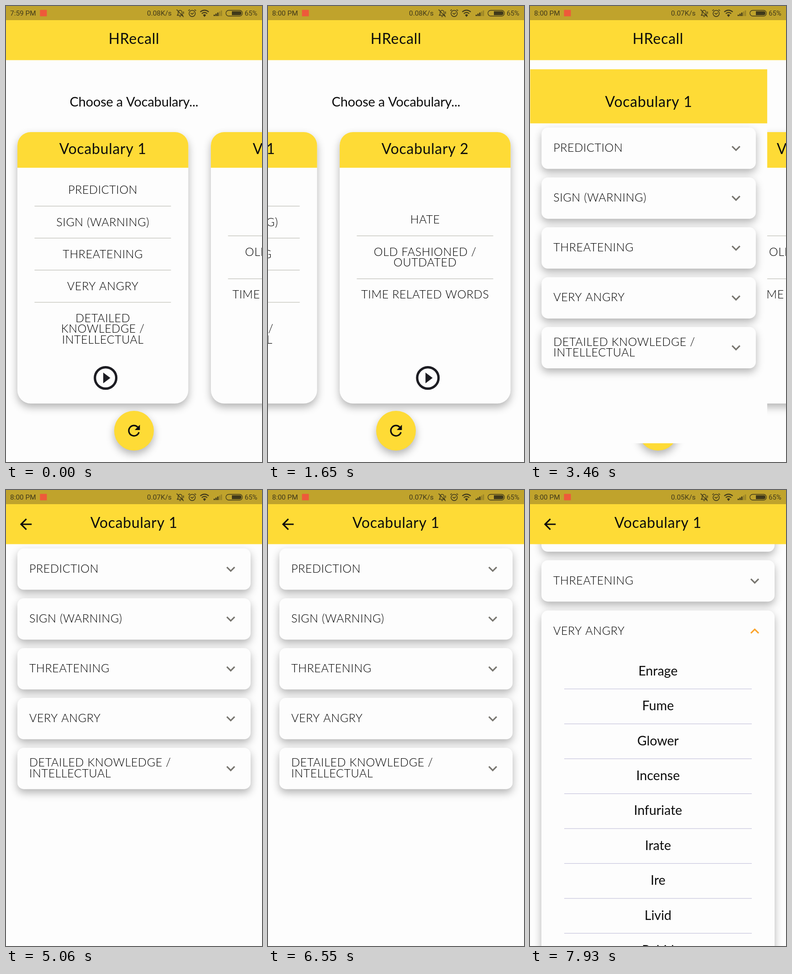
Animation, 561 px wide and 998 px high, one loop 7.99 s. Source, as an HTML page with a canvas:

```html
<!DOCTYPE html>
<html lang="en">
<head>
<meta charset="utf-8">
<title>Vocabulary cards</title>
<style>
  html, body { margin: 0; width: 100%; height: 100%; overflow: hidden; background: #fdfdfd; }
  canvas { display: block; width: 100vw; height: 100vh; }
</style>
</head>
<body>
<canvas id="stage"></canvas>
<script>
const W = 561, H = 998, LOOP = 7990, BAR = 118.5;
const YELLOW = '#fedb36', PAPER = '#fdfdfd', INK = '#0c0c0c', ORANGE = '#fba32b';
const canvas = document.getElementById('stage'), ctx = canvas.getContext('2d');
const dpr = window.devicePixelRatio || 1;
canvas.width = W * dpr;
canvas.height = H * dpr;

const TOPICS = ['PREDICTION', 'SIGN (WARNING)', 'THREATENING', 'VERY ANGRY',
  'DETAILED KNOWLEDGE /\nINTELLECTUAL'];
const WORDS = {
  0: ['Augur', 'Bode', 'Foretell', 'Harbinger', 'Oracle', 'Portend', 'Presage', 'Prophecy'],
  3: ['Enrage', 'Fume', 'Glower', 'Incense', 'Infuriate', 'Irate', 'Ire', 'Livid', 'Rabid', 'Seethe']
};
const DECKS = [
  { title: 'Vocabulary 1', rules: [438, 508, 578, 648.5], items: [[402, 'PREDICTION'],
    [472.5, 'SIGN (WARNING)'], [543, 'THREATENING'], [613, 'VERY ANGRY'],
    [683, 'DETAILED\nKNOWLEDGE /\nINTELLECTUAL']] },
  { title: 'Vocabulary 2', rules: [503, 597], items: [[467, 'HATE'],
    [537.5, 'OLD FASHIONED /\nOUTDATED'], [631, 'TIME RELATED WORDS']] }
];

const mix = (a, b, u) => a + (b - a) * u;

// Material standard curve, cubic-bezier(.4, 0, .2, 1)
function ease(u) {
  if (u <= 0) return 0;
  if (u >= 1) return 1;
  let lo = 0, hi = 1, s = u;
  for (let i = 0; i < 20; i++) {
    s = (lo + hi) / 2;
    const x = 1.2 * s * (1 - s) ** 2 + 0.6 * s * s * (1 - s) + s ** 3;
    if (x < u) lo = s; else hi = s;
  }
  return s * s * (3 - 2 * s);
}

// Smooth curve through [time, value] points
function track(t, pts) {
  const last = pts.length - 1;
  if (t <= pts[0][0]) return pts[0][1];
  if (t >= pts[last][0]) return pts[last][1];
  const i = pts.findIndex(p => p[0] > t) - 1;
  const slope = k => k < 1 || k >= last ? 0
    : (pts[k + 1][1] - pts[k - 1][1]) / (pts[k + 1][0] - pts[k - 1][0]);
  const [t0, a] = pts[i], [t1, b] = pts[i + 1], d = t1 - t0, u = (t - t0) / d;
  const rise = (b - a) / d;
  return mix(a, b, u)
    + d * u * (1 - u) * ((1 - u) * (slope(i) - rise) - u * (slope(i + 1) - rise));
}

const carousel = t => track(t, [[1010, 0], [1160, 95], [1300, 240], [1420, 326], [1540, 303],
  [1650, 292], [1760, 288], [1810, 288], [1960, 190], [2100, 45], [2220, -35], [2340, -15],
  [2450, -4], [2560, 0]]);
const listScroll = t => track(t, [[7540, 0], [7660, 45], [7800, 142], [7930, 192], [7990, 198]]);
const openness = (t, i) => i === 0 ? ease((t - 5390) / 300) - ease((t - 6190) / 300)
  : i === 3 ? ease((t - 6650) / 320) : 0;

function text(str, x, y, { size = 32, weight = 400, spacing = 0, align = 'center',
  color = INK, family = 'Lato', leading = 23.4 } = {}) {
  ctx.font = `${weight} ${size}px ${family}, sans-serif`;
  ctx.letterSpacing = spacing + 'px';
  ctx.textAlign = align;
  ctx.fillStyle = color;
  str.split('\n').forEach((line, i) => ctx.fillText(line, x, y + i * leading));
}
const heading = (str, x, y) => text(str, x, y, { spacing: 0.7 });
const topic = (str, x, y, align) =>
  text(str, x, y, { size: 25, weight: 300, spacing: 0.6, align, color: '#000' });

function rect(x, y, w, h, color) {
  ctx.fillStyle = color;
  ctx.fillRect(x, y, w, h);
}

function clipped(x, y, w, h, draw) {
  ctx.save();
  ctx.beginPath();
  ctx.rect(x, y, w, h);
  ctx.clip();
  draw();
  ctx.restore();
}

function raised(color, shape) {
  ctx.save();
  ctx.shadowColor = 'rgba(0,0,0,.29)';
  ctx.shadowBlur = 18 * dpr;
  ctx.shadowOffsetY = 8 * dpr;
  ctx.fillStyle = color;
  ctx.beginPath();
  shape();
  ctx.fill();
  ctx.restore();
}

// Icons live on a 24-unit grid centred on (x, y)
function icon(x, y, scale, color, { line, fill, width = 2, turn = 0 }) {
  ctx.save();
  ctx.translate(x, y);
  ctx.rotate(turn);
  ctx.scale(scale, scale);
  ctx.translate(-12, -12);
  ctx.strokeStyle = ctx.fillStyle = color;
  ctx.lineWidth = width;
  if (line) ctx.stroke(new Path2D(line));
  if (fill) ctx.fill(new Path2D(fill));
  ctx.restore();
}

function deckCard({ title, rules, items }, x) {
  const y = 276, w = 374.5, h = 594, mid = x + w / 2;
  raised(PAPER, () => ctx.roundRect(x, y, w, h, 29));
  ctx.fillStyle = YELLOW;
  ctx.beginPath();
  ctx.roundRect(x, y, w, 78, [29, 29, 0, 0]);
  ctx.fill();
  heading(title, mid, 324);
  for (const r of rules) rect(x + 37.5, r - 0.7, 299, 1.4, '#c6c6bf');
  for (const [cy, label] of items) topic(label, mid, cy + 9);
  icon(mid + 6, 814, 2.6, '#1c1c22',
    { line: 'M21 12A9 9 0 1 1 3 12A9 9 0 1 1 21 12Z', fill: 'M10 16.5l6-4.5-6-4.5z' });
}

function home(t) {
  rect(0, 0, W, H, PAPER);
  rect(0, 0, W, BAR, YELLOW);
  heading('HRecall', W / 2, 83);
  text('Choose a Vocabulary...', W / 2, 219.5, { size: 29, spacing: -0.2 });
  DECKS.forEach((deck, i) => deckCard(deck, 25 + i * 424 - carousel(t)));
  raised(YELLOW, () => ctx.arc(280.5, 929.5, 43.5, 0, 7));
  icon(280.5, 929.5, 1.62, INK, { line: 'M18.7 14A7 7 0 1 1 16.95 7.05', fill: 'M13 11h7V4z' });
}

function panel(i, top, w, open) {
  const words = WORDS[i] || [], body = open * (words.length * 76.4 + 12), h = 90.5 + body;
  raised(PAPER, () => ctx.roundRect(25, top, w - 50, h, 14));
  const lines = TOPICS[i].split('\n').length;
  topic(TOPICS[i], 51, top + 53 - (lines - 1) * 12, 'left');
  icon(w - 68.5, top + 45.3, 1.6, open > 0.5 ? ORANGE : '#77756f',
    { line: 'M6.7 9.3L12 14.6L17.3 9.3', turn: Math.PI * open });
  if (open > 0) clipped(25, top + 90, w - 50, body, () => words.forEach((word, k) => {
    const y = top + 142 + k * 76.4;
    text(word, w / 2, y, { size: 28.5 });
    if (k < words.length - 1) rect(75, y + 29, w - 150, 1.2, '#c5c3dc');
  }));
  return h;
}

function detail(t, x, y, w, h, landed) {
  clipped(x, y, w, h, () => {
    ctx.translate(x, y);
    rect(0, 0, w, h, PAPER);
    let top = 127.8 - listScroll(t);
    TOPICS.forEach((_, i) => {
      const open = openness(t, i);
      top += open;
      top += panel(i, top, w, open) + 18.6;
    });
    rect(0, 0, w, BAR, YELLOW);
    heading('Vocabulary 1', w / 2, 83);
    if (landed) icon(43.5, 75, 1.6, INK, { line: 'M20 12H5.5M12.7 4.7L5.4 12L12.7 19.3' });
  });
}

function statusBar(t) {
  const tone = '#40391a', opts = { size: 15.4, family: 'Roboto', align: 'left', color: tone };
  rect(0, 0, W, 31, 'rgba(30,20,20,.28)');
  text(t < 50 ? '7:59 PM' : '8:00 PM', 9, 21, opts);
  rect(74.5, 8.5, 15, 14, '#ee5a3a');
  const speed = t < 2610 ? '0.08' : t < 7350 ? '0.07' : '0.05';
  text(speed + 'K/s', 309, 21, opts);
  // muted bell, alarm clock, wifi
  icon(381.5, 15.5, 0.85, tone, { width: 1.8, line: 'M4 18H19L17 15V10A5 5 0 0 0 7 10V15L4 18M10 21H14M3 3L21 22M21 8V14' });
  icon(408, 15.5, 0.85, tone, { width: 1.9, line: 'M20 13A8 8 0 1 1 4 13A8 8 0 1 1 20 13M8 12L12 15L16 11M2 6L6 3M18 3L22 6' });
  icon(435, 15.5, 0.85, tone, { width: 2.5, line: 'M1 9Q12 0 23 9M5 13.5Q12 7.5 19 13.5', fill: 'M8 17Q12 13 16 17L12 22Z' });
  for (let i = 0; i < 5; i++) {
    const h = 3 + i * 2.3;
    rect(455 + i * 3.9, 22 - h, 2.8, h, i < 3 ? tone : 'rgba(64,57,26,.3)');
  }
  ctx.strokeStyle = ctx.fillStyle = tone;
  ctx.lineWidth = 1.3;
  ctx.beginPath();
  ctx.roundRect(482, 9.5, 36, 12.5, 6);
  ctx.stroke();
  ctx.beginPath();
  ctx.roundRect(495, 11.5, 21, 8.5, [0, 4, 4, 0]);
  ctx.fill();
  text('65%', 523, 21, { ...opts, size: 15 });
}

function render(t) {
  ctx.setTransform(dpr, 0, 0, dpr, 0, 0);
  const grow = ease((t - 3300) / 370);
  if (grow < 1) home(t);
  if (grow > 0) {
    // each edge of the card travels along its own arc
    const left = 25 * (1 - grow) ** 4, top = 276 * (1 - grow ** 1.8);
    const right = mix(399.5, W, grow ** 0.76), bottom = mix(870, H, grow);
    detail(t, left, top, right - left, bottom - top, grow === 1);
  }
  statusBar(t);
}

const start = performance.now();
function tick() {
  render((performance.now() - start) % LOOP);
  requestAnimationFrame(tick);
}
tick();
</script>
</body>
</html>
```
